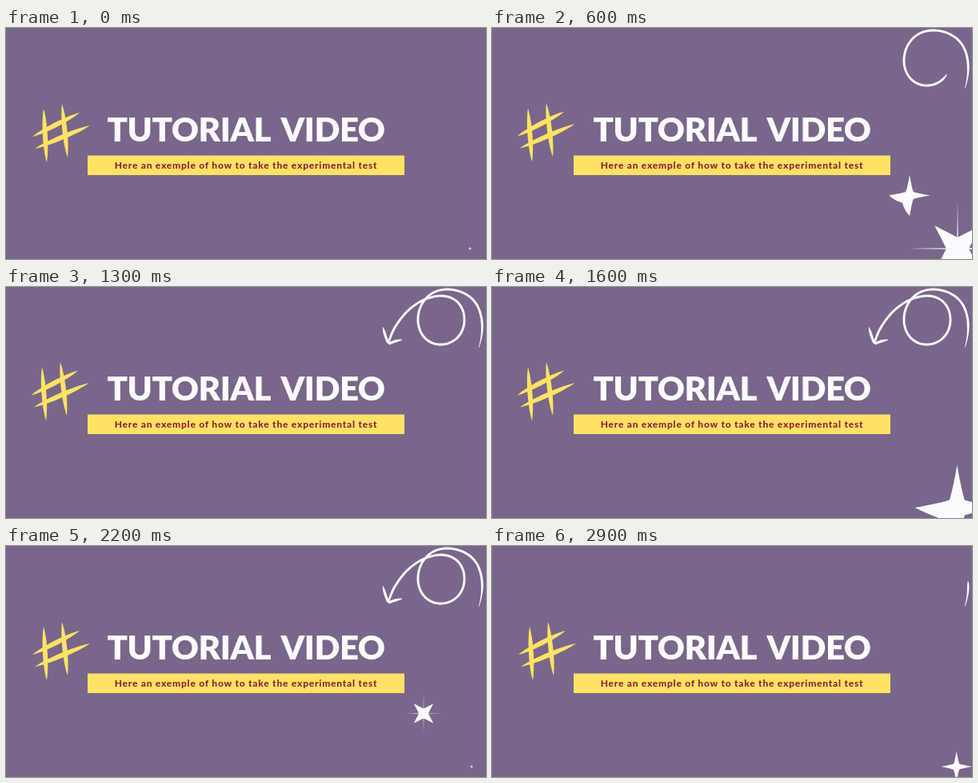
An HTML page for the animation above (3 s loop, 600x289 px).

```html
<!DOCTYPE html>
<html lang="en">
<head>
<meta charset="utf-8">
<title>Tutorial video</title>
<style>
  html, body { margin: 0; width: 100%; height: 100%; overflow: hidden; background: #78678a; }
  svg { display: block; width: 600px; height: 289px; }
  text { font-family: Lato, sans-serif; text-anchor: middle; }
  .title { font-size: 42px; font-weight: 900; letter-spacing: -.5px; word-spacing: 6px; fill: #fdfbff; }
  .sub { font-size: 12px; font-weight: 800; letter-spacing: .78px; fill: #8e1f3a; }
  .ink { fill: #fdfbff; }
  .gold { fill: #ffe263; }
</style>
</head>
<body>
<svg viewBox="0 0 600 289">
  <path id="hash" class="gold"/>
  <text class="title" x="300" y="142">TUTORIAL VIDEO</text>
  <rect class="gold" x="102" y="159.5" width="396" height="24.5"/>
  <text class="sub" x="300" y="175.5">Here an exemple of how to take the experimental test</text>
  <path id="shaft" class="ink"/>
  <path id="head" class="ink"/>
  <path id="bigStar" class="ink"/>
  <path id="smallStar" class="ink"/>
</svg>
<script>
const LOOP = 3000, STEP = 100;
const $ = id => document.getElementById(id);
const n = v => v.toFixed(2);

// Eased 0..1 ramp that begins at `from` and lasts `span`
function ramp(t, from, span) {
  const u = Math.min(1, Math.max(0, (t - from) / span));
  return u * u * (3 - 2 * u);
}

// Leaf-shaped brush stroke, pointed at both ends
function leaf(x1, y1, x2, y2, w = 4) {
  const dx = x2 - x1, dy = y2 - y1, len = Math.hypot(dx, dy);
  const at = (k, side) =>
    n(x1 + dx * k + dy / len * w * side) + ' ' + n(y1 + dy * k - dx / len * w * side);
  return `M${x1} ${y1}C${at(.25, 1)} ${at(.75, 1)} ${x2} ${y2}C${at(.75, -1)} ${at(.25, -1)} ${x1} ${y1}Z`;
}

$('hash').setAttribute('d', leaf(47, 101, 51, 168) + leaf(70, 95, 77, 162) +
  leaf(33, 136, 92, 106) + leaf(36, 151, 105, 122));

function curve(d) {
  const p = document.createElementNS('http://www.w3.org/2000/svg', 'path');
  p.setAttribute('d', d);
  return { p, len: p.getTotalLength() };
}

const shaft = curve('M591 76C596 60 598 40 589 23C580 7 560 1 545 3.5C527 6 514 23 515 43' +
  'C516 60 528 72 543 72C560 72 573 59 573 41C573 24 562 11 543 11' +
  'C526 12 512 20 500 32C488 45 481 58 478 71');
const head = curve('M471 50C473 57 475 64 478 71C483 69 488 67 495 66');

// Outline of the first `end` pixels of a curve, tapered at both ends
function ribbon({ p, len }, end, width, taper) {
  end = Math.min(end, len);
  if (end <= 1) return '';
  const left = [], right = [], count = Math.ceil(end / 3);
  for (let i = 0; i <= count; i++) {
    const s = end * i / count;
    const a = p.getPointAtLength(Math.max(0, s - .5));
    const b = p.getPointAtLength(Math.min(len, s + .5));
    const d = Math.hypot(b.x - a.x, b.y - a.y) || 1;
    const w = width / 2 * Math.min(1, .2 + s / taper, .4 + (end - s) / 12);
    const x = (a.x + b.x) / 2, y = (a.y + b.y) / 2;
    const nx = (b.y - a.y) / d * w, ny = (a.x - b.x) / d * w;
    left.push(n(x + nx) + ' ' + n(y + ny));
    right.unshift(n(x - nx) + ' ' + n(y - ny));
  }
  return 'M' + left.concat(right).join('L') + 'Z';
}

// Four spikes; `waist` sets how far the notches sit from the centre
function spikes(cx, cy, r, waist, turn, bulge = 1) {
  const at = (x, y, deg) => {
    const a = (deg + turn) * Math.PI / 180, c = Math.cos(a), s = Math.sin(a);
    return n(cx + r * (x * c - y * s)) + ' ' + n(cy + r * (x * s + y * c)) + ' ';
  };
  let d = 'M' + at(1, 0, 0);
  for (let q = 0; q < 4; q++) {
    const w = waist * (q === 1 ? bulge : 1), deg = q * 90;
    d += 'Q' + at(2.2 * w, .6 * w, deg) + at(w, w, deg) +
      'Q' + at(.6 * w, 2.2 * w, deg) + at(0, 1, deg);
  }
  return d + 'Z';
}

// Grows upright, turns into a diagonal body with thin rays, then shrinks to a dot
function star(cx, cy, r, t) {
  if (t < 0 || t > 840) return '';
  const fade = 1 - ramp(t, 560, 220);
  const swap = ramp(t, 400, 130);
  const len = Math.max(.04, ramp(t, 0, 280) * fade);
  const waist = .18 - .16 * (swap - ramp(t, 700, 80));
  const diag = .9 * ramp(t, 250, 150) * (1 - .25 * swap) * fade;
  return spikes(cx, cy, r * len, waist, 0, 1 + len * len * (1 - swap)) +
    (diag > 0 ? spikes(cx, cy, r * diag, .015 + .23 * swap, 45) : '');
}

function draw(t) {
  const beat = t % 1400, pen = ((t % 2650) - 195) * .58;
  const set = (id, d) => $(id).setAttribute('d', d);
  const tilted = (t + 50) % 240 >= 120;
  $('hash').setAttribute('transform', tilted ? 'translate(-1.5 -1) rotate(-1 69 131)' : '');
  set('shaft', ribbon(shaft, pen, 2.9, 35));
  set('head', ribbon(head, pen - shaft.len, 3.2, 8));
  set('bigStar', star(580 + Math.min(2, beat / 150), 276, 66, beat));
  set('smallStar', star(522, 209.5, 25.5, beat - 250));
}

function tick(now) {
  draw(Math.floor(now % LOOP / STEP) * STEP);
  requestAnimationFrame(tick);
}
draw(0);
requestAnimationFrame(tick);
</script>
</body>
</html>
```
